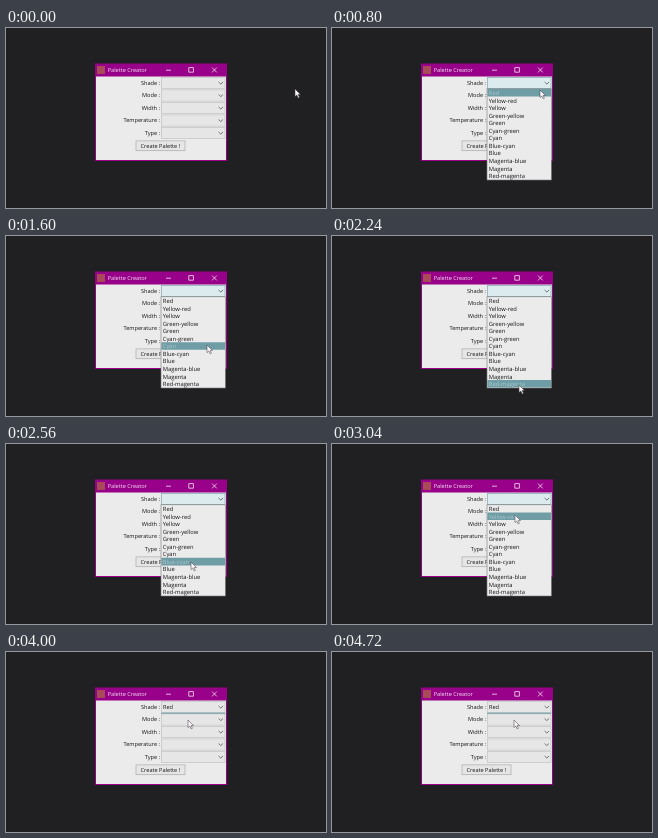
An HTML page for the animation above (4880 ms loop, 320 px wide and 180 px high).

```html
<!DOCTYPE html>
<html lang="en">
<head>
<meta charset="utf-8">
<title>Palette Creator</title>
<style>
  html, body { margin: 0; width: 100%; height: 100%; overflow: hidden; background: #202022; }
  svg { display: block; width: 320px; height: 180px; }
  text { font: 5.6px "Open Sans", "Noto Sans", sans-serif; text-rendering: geometricPrecision; }
  .label { text-anchor: end; }
  .field { fill: #e6e6e7; stroke: #c3c3c5; stroke-width: .7; }
  .chevron { fill: none; stroke: #555; stroke-width: .8; }
  .items { font-size: 5.8px; }
  .controls { fill: none; stroke: #f6e4f4; stroke-width: .8; }

  .list, .chosen, .active, .cursor { animation: 4880ms step-end infinite; }
  .list { --row: 0; animation-name: pick; }
  .row { transform: translateY(calc(var(--row) * 7.55px)); }
  .chosen { animation-name: chosen; }
  .active { animation-name: active; }
  .cursor { animation-name: move; }

  @keyframes pick {
    0%     { --row: 0; visibility: hidden; }
    16.39% { --row: 0; visibility: visible; }
    21.31% { --row: 1; visibility: visible; }
    22.95% { --row: 2; visibility: visible; }
    26.22% { --row: 3; visibility: visible; }
    29.5%  { --row: 5; visibility: visible; }
    32.78% { --row: 6; visibility: visible; }
    36.06% { --row: 8; visibility: visible; }
    39.34% { --row: 10; visibility: visible; }
    42.62% { --row: 11; visibility: visible; }
    49.18% { --row: 10; visibility: visible; }
    52.45% { --row: 7; visibility: visible; }
    57.37% { --row: 4; visibility: visible; }
    62.29% { --row: 1; visibility: visible; }
    65.57% { --row: 0; visibility: visible; }
    72.13%, 100% { --row: 0; visibility: hidden; }
  }
  @keyframes move {
    0%     { transform: translate(289px, 61px); }
    16.39% { transform: translate(208px, 62px); }
    18.03% { transform: translate(208px, 65px); }
    21.31% { transform: translate(207px, 72px); }
    22.95% { transform: translate(206px, 79px); }
    26.22% { transform: translate(205px, 88px); }
    29.5%  { transform: translate(203px, 101px); }
    32.78% { transform: translate(201px, 109px); }
    36.06% { transform: translate(197px, 125px); }
    39.34% { transform: translate(192px, 140px); }
    42.62% { transform: translate(189px, 148px); }
    45.9%  { transform: translate(187px, 149px); }
    49.18% { transform: translate(186px, 140px); }
    52.45% { transform: translate(185px, 118px); }
    57.37% { transform: translate(184px, 93px); }
    62.29% { transform: translate(183px, 71px); }
    65.57%, 100% { transform: translate(182px, 68px); }
  }
  @keyframes active {
    0%     { opacity: 0; }
    16.39% { opacity: 1; }
    75.4%  { opacity: .5; }
    78.68%, 100% { opacity: 0; }
  }
  @keyframes chosen {
    0%     { visibility: hidden; }
    72.13%, 100% { visibility: visible; }
  }
</style>
</head>
<body>
<svg viewBox="0 0 320 180">
  <defs>
    <g id="combo">
      <rect class="field" x="155.4" y="49.4" width="63.6" height="11.2"/>
      <path class="chevron" d="M212.6 54l2.2 2.1 2.2-2.1"/>
    </g>
    <text id="items" class="items" y="59.5">
      <tspan x="156.8" dy="7.55">Red</tspan>
      <tspan x="156.8" dy="7.55">Yellow-red</tspan>
      <tspan x="156.8" dy="7.55">Yellow</tspan>
      <tspan x="156.8" dy="7.55">Green-yellow</tspan>
      <tspan x="156.8" dy="7.55">Green</tspan>
      <tspan x="156.8" dy="7.55">Cyan-green</tspan>
      <tspan x="156.8" dy="7.55">Cyan</tspan>
      <tspan x="156.8" dy="7.55">Blue-cyan</tspan>
      <tspan x="156.8" dy="7.55">Blue</tspan>
      <tspan x="156.8" dy="7.55">Magenta-blue</tspan>
      <tspan x="156.8" dy="7.55">Magenta</tspan>
      <tspan x="156.8" dy="7.55">Red-magenta</tspan>
    </text>
  </defs>

  <!-- window -->
  <rect x="89" y="35.5" width="132" height="97.5" fill="#98008a"/>
  <rect x="90" y="48.5" width="130" height="83.5" fill="#ebebec"/>
  <rect x="91" y="38" width="8" height="8" fill="#a84a58"/>
  <text x="101.7" y="44.2" fill="#f6e4f4">Palette Creator</text>
  <path class="controls" d="M160 42.2h5M182.8 39.6h4.6v4.6h-4.6zM206 39.6l4.8 4.8M210.8 39.6l-4.8 4.8"/>

  <!-- form -->
  <g fill="#161616">
    <text class="label" x="154" y="56.6">Shade :</text>
    <text class="label" x="154" y="69.1">Mode :</text>
    <text class="label" x="154" y="81.6">Width :</text>
    <text class="label" x="154" y="94.1">Temperature :</text>
    <text class="label" x="154" y="106.6">Type :</text>
  </g>
  <use href="#combo"/>
  <use href="#combo" y="12.5"/>
  <use href="#combo" y="25"/>
  <use href="#combo" y="37.5"/>
  <use href="#combo" y="50"/>
  <rect class="field" x="130" y="112.9" width="49" height="9.8" style="stroke:#aaaaac"/>
  <text x="154.4" y="119.8" text-anchor="middle" fill="#161616">Create Palette !</text>

  <g class="active">
    <rect x="155.4" y="49.4" width="63.6" height="11.2" fill="#dcebee" stroke="#86aab0" stroke-width=".7"/>
    <path class="chevron" d="M212.6 54l2.2 2.1 2.2-2.1"/>
  </g>
  <g class="chosen">
    <path d="M155 61.2h64.4" stroke="#5b939c" stroke-width=".9"/>
    <text x="157" y="56.6" fill="#161616">Red</text>
  </g>

  <!-- drop-down -->
  <g class="list">
    <clipPath id="row"><rect class="row" x="155.4" y="61" width="63.6" height="7.55"/></clipPath>
    <rect x="155" y="60.8" width="64.4" height="91.2" fill="#ebebec" stroke="#77777a" stroke-width=".6"/>
    <use href="#items" fill="#161616"/>
    <g clip-path="url(#row)">
      <rect x="155" y="60" width="65" height="93" fill="#6f9da6"/>
      <use href="#items" fill="#a9c6cb"/>
    </g>
  </g>

  <path class="cursor" d="M0 0v7.6l1.8-1.6 1.3 2.9 1.3-.6-1.3-2.8h2.4z" fill="#fbf3f8" stroke="#3a3a3c" stroke-width=".5"/>
</svg>
</body>
</html>
```
